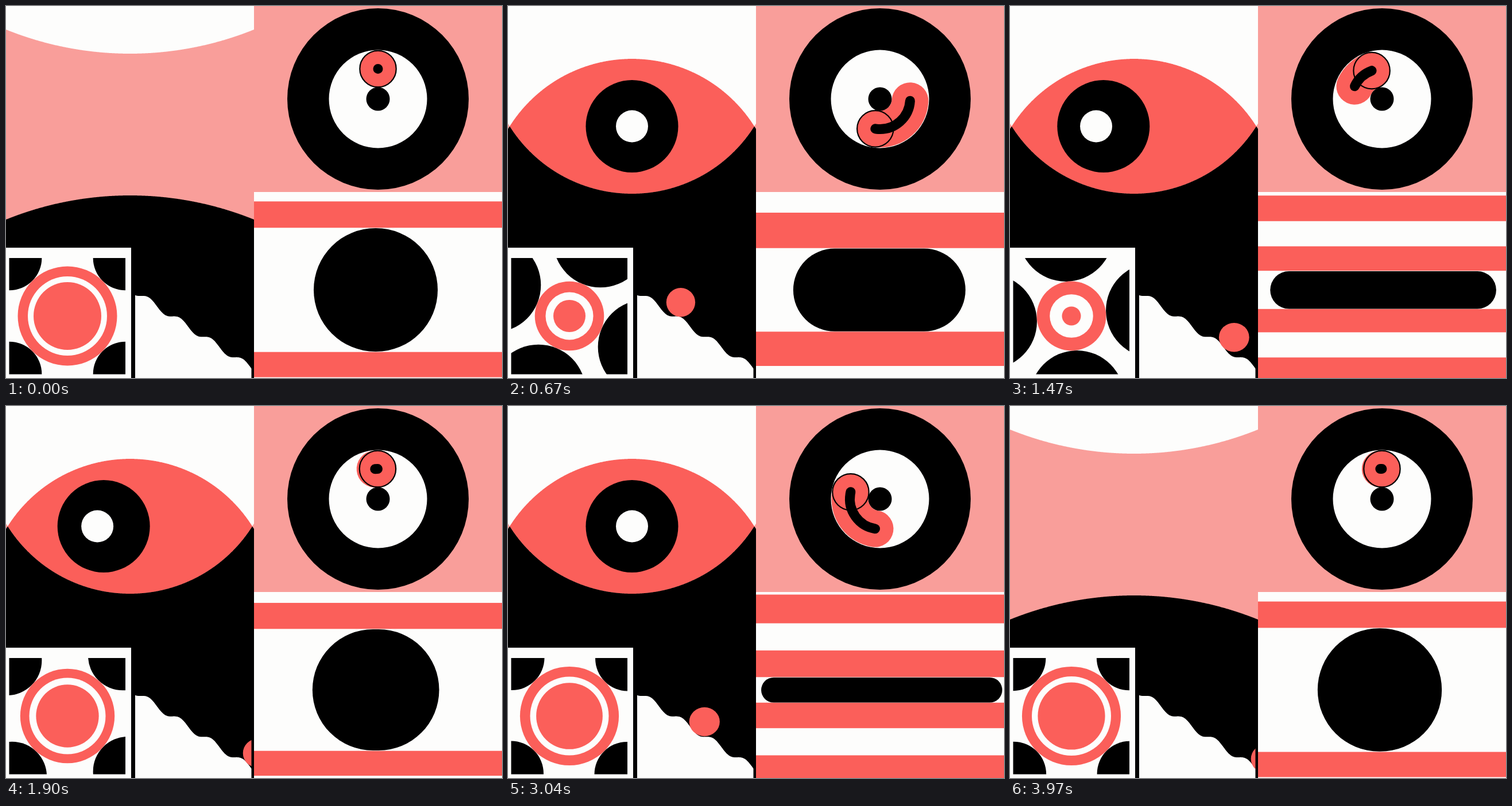
These frames come from a looping animation (864 px wide and 648 px high, 4 s). An HTML page with a canvas:

```html
<!DOCTYPE html>
<html lang="en">
<head>
<meta charset="utf-8">
<title>Eye loops</title>
<style>
  html, body { margin: 0; width: 100%; height: 100%; overflow: hidden; background: #fdfdfc; }
  canvas { display: block; width: 864px; height: 648px; }
</style>
</head>
<body>
<canvas id="stage" width="864" height="648"></canvas>
<script>
const ctx = document.getElementById('stage').getContext('2d');
const TAU = Math.PI * 2;
const WHITE = '#fdfdfc', BLACK = '#000', RED = '#fb5f5a', PINK = '#f99e9a';

const clamp = (v) => Math.max(0, Math.min(1, v));
const lerp = (a, b, p) => a + (b - a) * p;
const smooth = (v) => { v = clamp(v); return v * v * (3 - 2 * v); };
const ramp = (t, from, to) => smooth((t - from) / (to - from));

// Timing curve with handles (a, 0) and (b, 1)
function bezier(a, b) {
  return (x) => {
    if (x <= 0) return 0;
    if (x >= 1) return 1;
    let lo = 0, hi = 1;
    for (let i = 0; i < 24; i++) {
      const s = (lo + hi) / 2, r = 1 - s;
      if (3 * a * s * r * r + 3 * b * s * s * r + s * s * s < x) lo = s; else hi = s;
    }
    return smooth(lo);
  };
}
const swift = bezier(0.227, 0.298);
const snap = bezier(0.97, 0.565);

function rect(x, y, w, h, color) {
  ctx.fillStyle = color;
  ctx.fillRect(x, y, w, h);
}

function disc(x, y, r, color, ry = r) {
  ctx.beginPath();
  ctx.ellipse(x, y, Math.max(0, r), Math.max(0, ry), 0, 0, TAU);
  ctx.fillStyle = color;
  ctx.fill();
}

function clipped(x, y, w, h, draw) {
  ctx.save();
  ctx.beginPath();
  ctx.rect(x, y, w, h);
  ctx.clip();
  draw();
  ctx.restore();
}

function mix(p) {
  const from = [249, 158, 154], to = [251, 95, 90];
  return `rgb(${from.map((v, i) => Math.round(lerp(v, to[i], p)))})`;
}

// Circular arc across the panel, given its middle and end heights
function lid(mid, side) {
  const sag = side - mid;
  if (Math.abs(sag) < 0.01) return () => mid;
  const R = (216 * 216 + sag * sag) / (2 * Math.abs(sag));
  return (x) => mid + Math.sign(sag) * (R - Math.sqrt(Math.max(0, R * R - (x - 216) ** 2)));
}

function trace(fn, x0, x1, step) {
  for (let x = x0; step > 0 ? x <= x1 : x >= x1; x += step) ctx.lineTo(x, fn(x));
}

function drawEye(t) {
  const time = Math.min(t, 3960 - t);
  const open = smooth(time / 430);
  const bump = 95 * open * (1 - open);
  const upper = lid(lerp(83, 92, open) + bump, lerp(41, 214.2, open));
  const lower = lid(lerp(330, 327, open) - bump, lerp(372, 204.8, open));
  const top = (x) => Math.min(upper(x), lower(x));
  const bottom = (x) => Math.max(upper(x), lower(x));

  rect(0, 0, 432, 648, PINK);

  ctx.save();
  ctx.beginPath();
  trace(upper, 0, 432, 1);
  trace((x) => Math.max(upper(x), lower(x) ), 432, 0, -1);
  ctx.closePath();
  ctx.clip();
  const inner = open > 0.95 ? 3 : 0;
  rect(inner, 0, 432 - 2 * inner, 648, mix(open));
  const u = clamp(time / 500) - 1;
  const scale = Math.max(0, 1 + 2.1 * u ** 3 + 1.1 * u * u);
  const look = 54 * (-ramp(t, 1100, 1500) + 2 * ramp(t, 1800, 2400) - ramp(t, 2600, 3000));
  const y = 209.5 + 190 * (1 - open);
  disc(216 + look, y, 80.5 * scale, BLACK);
  disc(216 + look * 1.24, y, 28 * scale, WHITE);
  ctx.restore();

  ctx.beginPath();
  ctx.moveTo(0, 0);
  trace(top, 0, 432, 1);
  ctx.lineTo(432, 0);
  ctx.fillStyle = WHITE;
  ctx.fill();

  ctx.beginPath();
  ctx.moveTo(0, 648);
  trace(bottom, 0, 432, 1);
  ctx.lineTo(432, 648);
  ctx.fillStyle = BLACK;
  ctx.fill();
}

function drawOrbit(t) {
  const cx = 648, cy = 162, R = 52.5;
  const head = TAU * swift(t / 2000) - TAU / 4;
  const tail = TAU * 0.991 * smooth(t / 2000) - TAU / 4;
  const from = Math.min(tail, head - 0.0005);

  rect(432, 0, 432, 324, PINK);
  disc(cx, cy, 158, BLACK);
  disc(cx, cy, 85.5, WHITE);

  const trail = (width, color) => {
    ctx.beginPath();
    ctx.arc(cx, cy, R, from, head);
    ctx.lineWidth = width;
    ctx.lineCap = 'round';
    ctx.strokeStyle = color;
    ctx.stroke();
  };
  trail(64, RED);
  ctx.beginPath();
  ctx.arc(cx + R * Math.cos(head), cy + R * Math.sin(head), 31.7, 0, TAU);
  ctx.lineWidth = 2.2;
  ctx.strokeStyle = BLACK;
  ctx.stroke();
  trail(17, BLACK);
  disc(cx, cy, 20.5, BLACK);
}

// Squeeze and release; a late edge starts both moves later
const squeeze = (t, lag) => t < 1000 + lag
  ? snap((t - lag) / 1000)
  : 1 - snap((t - 1000 - lag) / (1000 - lag));

function drawPress(t) {
  rect(432, 324, 432, 324, WHITE);
  clipped(432, 324, 432, 324, () => {
    const edge = (y, lag) => y + 86 * squeeze(t, lag);
    const stripe = (near, far, shift) => {
      rect(432, far, 432, near - far, RED);
      rect(432, 989 - near - shift, 432, near - far - 2 + shift, RED);
    };
    stripe(edge(386.3, 0), edge(340.4, 100), 0);
    stripe(edge(295, 150), edge(249, 200), 2);

    const p = squeeze(t, 0);
    const left = lerp(536, 441, p), right = lerp(752, 861, p);
    const top = lerp(387, 473, p), bottom = lerp(602, 516.5, p);
    ctx.beginPath();
    ctx.roundRect(left, top, right - left, bottom - top, (bottom - top) / 2);
    ctx.fillStyle = BLACK;
    ctx.fill();
  });
}

function drawGears(t) {
  const cx = 107, cy = 540, dist = 142.8;
  const v = (t % 1000) / 1000;
  const pulse = (rest, low, down, up, end) =>
    lerp(rest, low, ramp(v, 0, down) - ramp(v, up, end));
  const outer = pulse(86.5, 57.3, 0.59, 0.59, 1);
  const ring = pulse(69, 35.5, 0.56, 0.56, 0.97);
  const core = pulse(59, 16.5, 0.42, 0.5, 1);

  rect(0, 421, 218, 227, WHITE);
  clipped(5.5, 439, 202.5, 202.5, () => {
    for (let i = 0; i < 4; i++) {
      const a = (smooth(v) + i + 0.5) * TAU / 4;
      disc(cx + dist * Math.cos(a), cy + dist * Math.sin(a), dist - outer, BLACK);
    }
    disc(cx, cy, outer, RED);
    disc(cx, cy, ring, WHITE);
    disc(cx, cy, core, RED);
  });
}

const STEP = 54.5;
const ground = (x) => {
  const d = x - 235.5;
  return 505 + d * 0.654 - 6 * Math.sin(TAU * d / STEP);
};

// Height of a ball of radius r resting on the ground at x
function rest(x, r) {
  let y = Infinity;
  for (let d = -r; d <= r; d += 0.5) {
    y = Math.min(y, ground(x + d) - Math.sqrt(r * r - d * d));
  }
  return y;
}

function drawSlope(t) {
  clipped(225, 421, 202.5, 227, () => {
    ctx.beginPath();
    ctx.moveTo(225, 648);
    trace(ground, 225, 428, 1);
    ctx.lineTo(428, 648);
    ctx.fillStyle = WHITE;
    ctx.fill();

    const x = 226 + 0.1117 * t - 27 * clamp(1 - t / 300) ** 2;
    const rx = 25.3 + 1.3 * Math.cos(TAU * (x - 341) / STEP);
    disc(x, rest(x, 25), rx, RED, 25.2);
  });
}

function frame(now) {
  const t = now % 4000, half = t % 2000;
  ctx.clearRect(0, 0, 864, 648);
  drawEye(t);
  drawGears(half);
  drawSlope(half);
  drawOrbit(half);
  drawPress(half);
  requestAnimationFrame(frame);
}

let start;
requestAnimationFrame(function begin(now) {
  start = now;
  const loop = (time) => frame(time);
  loop(now);
});
</script>
</body>
</html>
```
